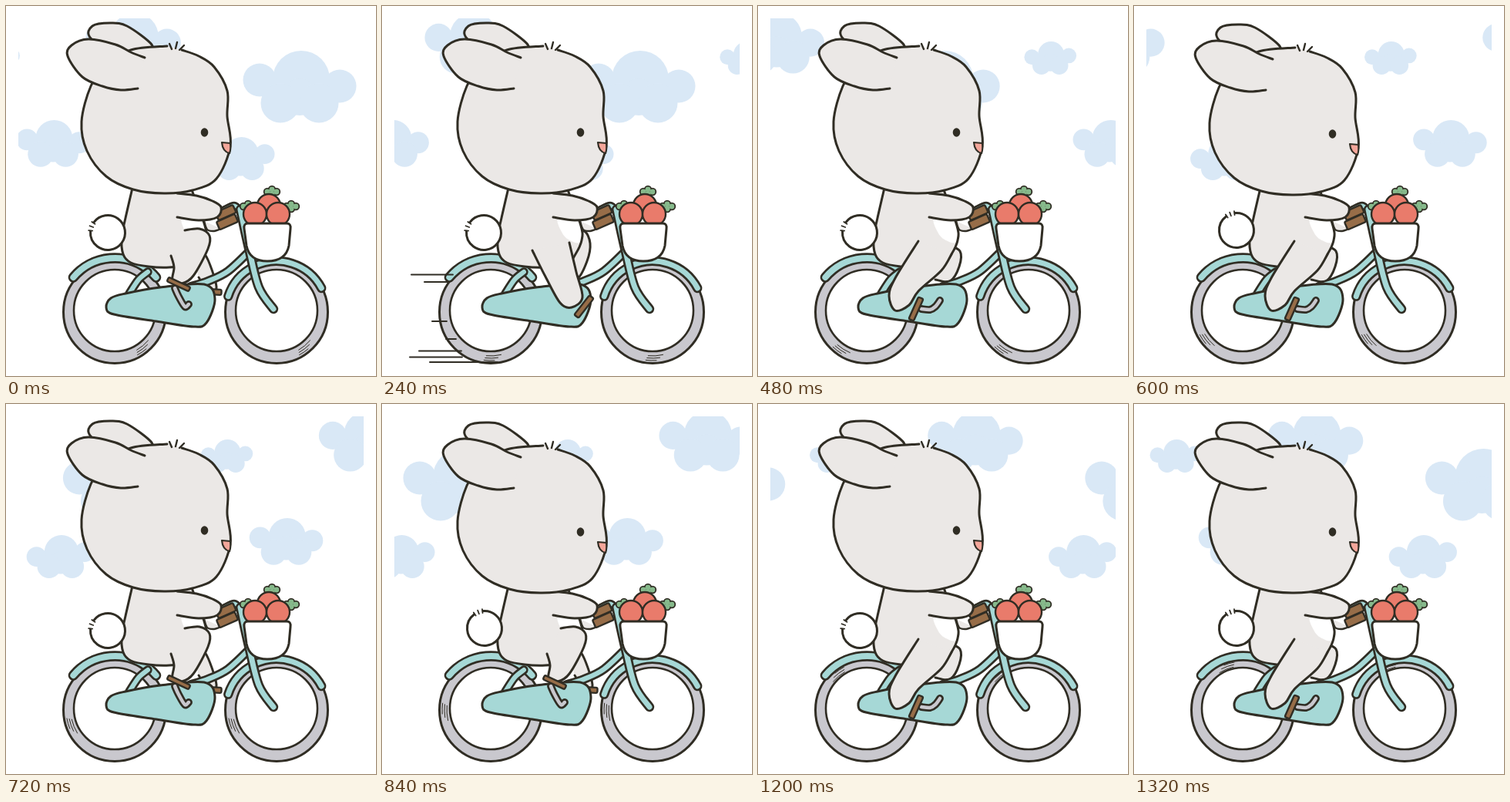
Recreate the animation shown at these times as an HTML page with a canvas. Size 480x480 px, loop 1.44 s.

```html
<!DOCTYPE html>
<html lang="en">
<head>
<meta charset="utf-8">
<title>Bunny ride</title>
<style>
html, body { margin: 0; width: 100%; height: 100%; overflow: hidden; background: #fff; }
canvas { display: block; width: 480px; height: 480px; }
</style>
</head>
<body>
<canvas id="stage" width="480" height="480"></canvas>
<script>
const ctx = document.getElementById('stage').getContext('2d');
const INK = '#302d24', FUR = '#ebe8e6', TEAL = '#a6d8d6', GREY = '#c9c8ce';
const BROWN = '#976d48', SKY = '#d9e8f6', ORANGE = '#e97b6b', GREEN = '#86b98b';
const STEP = 120, STEPS = 12, WRAP = 536, TURN = Math.PI * 2, DEG = Math.PI / 180;

// Smooth curve through key points written as "x,y x,y ..."
function curve(text, closed) {
  const p = text.split(' ').map(s => s.split(',').map(Number));
  const n = p.length, path = new Path2D();
  const at = i => closed ? p[(i + n) % n] : p[Math.max(0, Math.min(n - 1, i))];
  path.moveTo(...p[0]);
  for (let i = 0; i < (closed ? n : n - 1); i++) {
    const a = at(i - 1), b = at(i), c = at(i + 1), d = at(i + 2);
    path.bezierCurveTo(b[0] + (c[0] - a[0]) / 6, b[1] + (c[1] - a[1]) / 6,
      c[0] - (d[0] - b[0]) / 6, c[1] - (d[1] - b[1]) / 6, c[0], c[1]);
  }
  if (closed) path.closePath();
  return path;
}

function arc(x, y, r, from = 0, to = TURN) {
  const path = new Path2D();
  path.arc(x, y, r, from, to);
  return path;
}

function line(path, width = 3, color = INK) {
  ctx.lineWidth = width;
  ctx.strokeStyle = color;
  ctx.stroke(path);
}

function fill(path, color) {
  ctx.fillStyle = color;
  ctx.fill(path);
}

function shape(path, color, width) {
  fill(path, color);
  line(path, width);
}

function tube(path, width, color = TEAL) {
  line(path, width + 5.4);
  line(path, width, color);
}

function bar(x, y, length, width, degrees) {
  ctx.save();
  ctx.translate(x, y);
  ctx.rotate(degrees * DEG);
  const path = new Path2D();
  path.roundRect(-length / 2, -width / 2, length, width, 2);
  shape(path, BROWN, 2.4);
  ctx.restore();
}

// A cloud is one crown with a pair of side puffs and a pair of base puffs
function drawCloud(x, y, scale, tilt) {
  const puff = (px, py, r) => fill(arc(x + px * scale, y + py * scale, r * scale), SKY);
  puff(76, 37, 37);
  puff(74, 60, 24);
  for (const side of [-1, 1]) {
    puff(74 + side * 52, 42 + side * tilt, 21.5);
    puff(74 + side * 25, 68, 25.5);
  }
}

function drawClouds(shift) {
  ctx.save();
  ctx.beginPath();
  ctx.rect(16, 16, 448, 448);
  ctx.clip();
  const place = (x, y, scale, tilt) => {
    const left = ((x - shift + 160) % WRAP + WRAP) % WRAP - 160;
    drawCloud(left, y, scale, tilt);
    drawCloud(left + WRAP, y, scale, tilt);
  };
  place(307, 58, 1, 4);
  place(103, 9, .84, 4);
  place(486, 46, .46, -2);
  place(13, 148, .65, 3);
  place(260, 170, .6, -5);
  ctx.restore();
}

function drawWheel(x, y, angle) {
  shape(arc(x, y, 66.5), GREY);
  shape(arc(x, y - 2, 53), '#fff', 2.6);
  for (let k = 0; k < 3; k++) {
    const mid = angle + k * .05, half = .17 - k * .03;
    line(arc(x, y, 57 + k * 3, mid - half, mid + half), 1);
  }
}

const poses = [
  {
    leg: curve('232,291 251,289 264,298 262,315 243,350 228,360 216,356 218,339 214,324'),
    far: curve('240,318 258,322 273,364 262,370 250,352'),
    crank: curve('219,366 224,377 232,390 237,387'),
    pedal: [224, 361, 31, 6, 25],
    farPedal: [271, 371, 17, 7, 3]
  },
  {
    leg: curve('195,317 212,351 231,385 246,391 260,378 252,345 243,307'),
    far: curve('245,300 262,292 270,308 266,331 253,354 240,345'),
    pedal: [262, 390, 32, 7, -52]
  },
  {
    leg: curve('208,305 178,353 170,376 178,395 196,388 208,370 238,343 251,322'),
    far: curve('245,310 262,318 261,338 249,357 230,355'),
    crank: curve('212,393 223,394 230,390 236,382'),
    pedal: [205, 393, 31, 7, -66]
  }
];

const stay = curve('184,345 172,355 160,373');
const topTube = curve('240,364 262,357 288,344 318,316');
const handlebar = curve('282,265 296,259 304,266');
const fork = curve('304,264 315,314 328,365 347,393');
const guard = curve('130,391 136,379 155,373 200,365 257,361 271,380 260,411 243,416 195,409 140,400', true);
const speedLines = new Path2D('M38 348.5h54M55 358h30M65 409h19M83 432h13M48 447.5h55M36 455.5h68M62 462h88');

const body = curve('164,236 155,275 150,300 152,322 162,333 185,338 212,339 240,335 251,322 259,304 258,285 240,236');
const belly = curve('229,276 233,293 242,303 257,306 258,280', true);
const arm = curve('222,243 247,246 268,253 279,261 274,274 250,278 222,274');
const farArm = curve('257,279 261,290 270,292 279,289');
const basket = new Path2D('M314 282H364Q370 282 369 289L367 311Q363 331 339 331Q316 331 312 311L309 289Q308 282 314 282Z');

const head = curve('228,57 250,65 270,79 287,110 287,143 291,182 273,224 242,239 205,243 165,238 130,221 105,188 98,150 110,104 130,76 162,57 209,52');
const earBack = curve('150,70 110,42 112,26 135,22 157,26 189,50 185,62');
const earFront = curve('180,67 162,60 142,50 107,43 85,51 80,65 99,92 125,104 149,109 171,107');
const nose = new Path2D('M280 177L291 178Q292 186 290 191Q281 189 280 177Z');
const tufts = new Path2D('M212 49l3 7M222 47l-2 8M231 51l-6 6');

function drawCarrot(x, y, lean) {
  const leaves = new Path2D();
  for (let a = 0; a < TURN; a += TURN / 4)
    leaves.addPath(arc(x + 13 * lean + 4 + Math.cos(a) * 6, y - 10 - 8 * !lean + Math.sin(a) * 3, 3.4));
  line(leaves, 3.6);
  fill(leaves, GREEN);
  shape(arc(x, y, 15), ORANGE, 2.4);
}

function drawBike(pose, spin) {
  drawWheel(141, 397, spin);
  drawWheel(351, 397, spin);
  tube(arc(141, 397, 70, 220 * DEG, 320 * DEG), 8);
  tube(stay, 6);
  shape(pose.far, FUR);
  if (pose.farPedal) bar(...pose.farPedal);
  tube(topTube, 6.5);
  tube(arc(351, 397, 66, 198 * DEG, 332 * DEG), 7);
  tube(handlebar, 5);
  tube(fork, 7);
  shape(guard, TEAL);
}

function drawRider(pose) {
  fill(body, FUR);
  fill(belly, '#fff');
  line(body);
  if (pose.crank) tube(pose.crank, 4.5, GREY);
  shape(pose.leg, FUR);
  bar(...pose.pedal);
  shape(farArm, FUR, 2.4);
  bar(285, 268, 25, 11, -24);
  bar(287, 280, 26, 11, -24);
  shape(arm, FUR);
}

function drawBasket() {
  drawCarrot(341, 259, 0);
  drawCarrot(323, 270, -1);
  drawCarrot(353, 270, 1);
  shape(basket, '#fff');
}

function drawHead(drop) {
  ctx.save();
  ctx.translate(0, drop);
  shape(earBack, FUR);
  shape(head, FUR);
  shape(earFront, FUR);
  line(tufts, 2.4);
  shape(nose, '#f4a69a', 2.2);
  ctx.beginPath();
  ctx.ellipse(257.5, 164, 4.8, 5.8, 0, 0, TURN);
  ctx.fillStyle = INK;
  ctx.fill();
  ctx.restore();
}

function drawTail(wag) {
  const x = 132 + wag, y = 294 - 3 * wag, gap = 3.5 + .85 * wag;
  fill(arc(x, y, 22.5), '#fff');
  line(arc(x, y, 22.5, gap + .28, gap - .28 + TURN));
  for (let k = -1; k < 2; k++) {
    const a = gap + k * .24, c = Math.cos(a), s = Math.sin(a), hair = new Path2D();
    hair.moveTo(x + c * 20, y + s * 20);
    hair.lineTo(x + c * 25, y + s * 25);
    line(hair, 1.8);
  }
}

function draw(i) {
  const pose = poses[Math.floor(i / 2) % 3], beat = i % 2;
  ctx.fillStyle = '#fff';
  ctx.fillRect(0, 0, 480, 480);
  ctx.lineCap = ctx.lineJoin = 'round';
  // Clouds start at half speed
  drawClouds(46.4 * i - 22.4 * Math.min(i, 2));
  drawBike(pose, (50 + 18 * i) * DEG);
  if (pose === poses[1]) line(speedLines, 1.9);
  drawRider(pose);
  drawBasket();
  drawHead(beat * 2);
  drawTail(beat);
}

const start = performance.now();
function tick() {
  draw(Math.floor((performance.now() - start) / STEP) % STEPS);
  requestAnimationFrame(tick);
}
tick();
</script>
</body>
</html>
```
